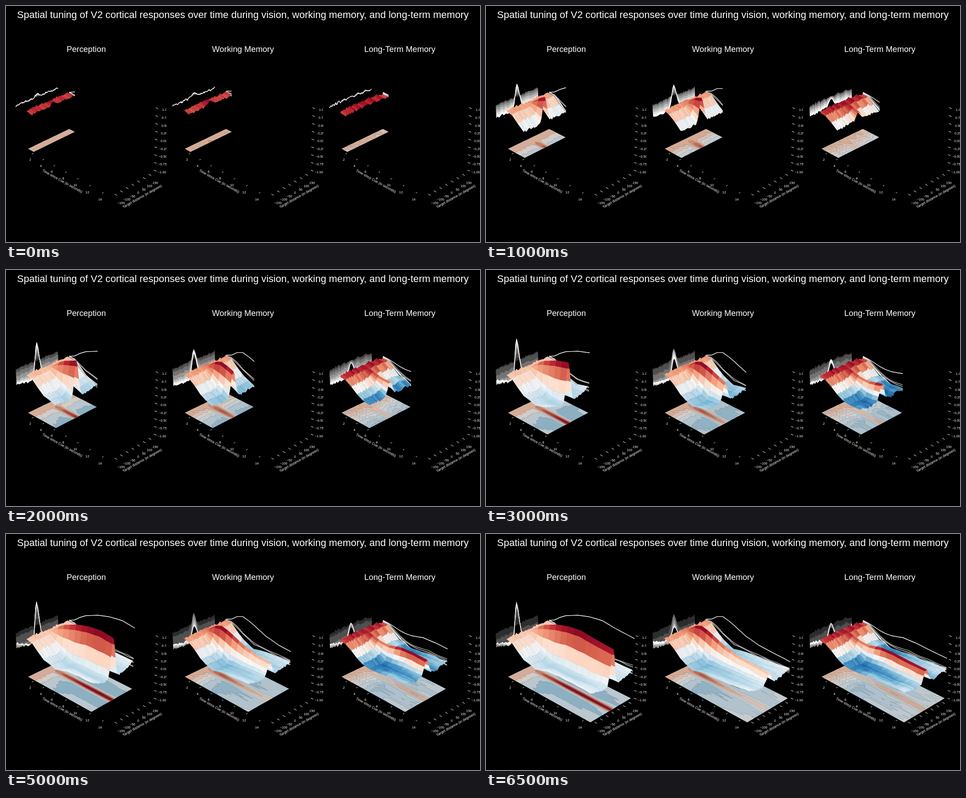
An HTML page with a canvas that plays this animation: 1058x529 px, repeating every 7500 ms.

```html
<!DOCTYPE html>
<html lang="en">
<head>
<meta charset="utf-8">
<title>Spatial tuning over time</title>
<style>
html, body { margin: 0; width: 100%; height: 100%; overflow: hidden; background: #000; }
canvas { display: block; width: 1058px; height: 529px; }
</style>
</head>
<body>
<canvas id="stage"></canvas>
<script>
const W = 1058, H = 529, STEP = 500, LOOP = 7500, LAST = 14, N = 36, PANEL = 350;
const canvas = document.getElementById('stage');
const dpr = window.devicePixelRatio || 1;
canvas.width = W * dpr;
canvas.height = H * dpr;
const ctx = canvas.getContext('2d');
const FONT = '"Liberation Sans", Arial, sans-serif';

const BASE_U = [0, 1, 3, 5, 7, 9, 11, 14];
const PEAK_U = [0, 1, 2, 3, 4, 5, 7, 9, 11, 14];
const panels = [
  { title: 'Perception', band: .2, width: .049, rough: .022,
    edge: [.26, .24, -.13, -.23, -.10, -.05, -.07, -.08],
    trough: [.28, .26, -.13, -.32, -.28, -.30, -.27, -.20],
    peak: [.27, .37, .54, .68, .77, .86, .98, 1.03, .97, .91] },
  { title: 'Working Memory', band: .12, width: .053, rough: .025,
    edge: [.26, .24, -.13, -.28, -.18, -.15, -.13, -.03],
    trough: [.30, .27, -.12, -.32, -.25, -.22, -.18, -.14],
    peak: [.32, .40, .57, .65, .60, .53, .35, .26, .23, .19] },
  { title: 'Long-Term Memory', band: .08, width: .055, rough: .028,
    edge: [.25, .22, -.08, -.22, -.15, -.10, -.08, -.03],
    trough: [.27, .24, -.05, -.26, -.24, -.20, -.18, -.13],
    peak: [.28, .27, .24, .20, .18, .20, .31, .33, .31, .30] }
];

const RAMP = ['053061', '2166ac', '4393c3', '92c5de', 'd1e5f0', 'f7f7f7',
  'fddbc7', 'f4a582', 'd6604d', 'b2182b', '67001f']
  .map(h => [0, 2, 4].map(i => parseInt(h.slice(i, i + 2), 16)));

// t runs from -1 (blue) to 1 (red)
function ramp(t, dim = 1) {
  const x = Math.max(0, Math.min(9.999, (t + 1) * 5)), i = Math.floor(x);
  const c = RAMP[i].map((a, k) => Math.round((a + (RAMP[i + 1][k] - a) * (x - i)) * dim));
  return `rgb(${c})`;
}

function lerpKnots(xs, ys, x) {
  let i = 0;
  while (i < xs.length - 2 && x > xs[i + 1]) i++;
  return ys[i] + (ys[i + 1] - ys[i]) * (x - xs[i]) / (xs[i + 1] - xs[i]);
}

function noise(a, b, c) {
  const s = Math.sin(a * 127.1 + b * 311.7 + c * 74.7 + 3.3) * 43758.5453;
  return 2 * (s - Math.floor(s)) - 1;
}

function buildGrid(p, id) {
  p.z = [];
  for (let u = 0; u <= LAST; u++) {
    const e = lerpKnots(BASE_U, p.edge, u), t = lerpKnots(BASE_U, p.trough, u);
    const top = lerpKnots(PEAK_U, p.peak, u);
    p.z.push(Array.from({ length: N + 1 }, (_, j) => {
      const v = j / N;
      const base = e + (t - e) * Math.min(1, 1.3 * Math.sin(Math.PI * v));
      const bell = Math.exp(-.5 * ((v - .498) / p.width) ** 2);
      const rough = p.rough * (1.3 * noise(j, 0, id) + noise(j, u + 1, id));
      return base + (top - base) * bell + rough * (1 - .8 * bell);
    }));
  }
}
panels.forEach(buildGrid);

// time u (0..14), distance v (0..1), value z
function project(u, v, z) {
  const h = z + 1, w = 1 - .0067 * u + .0517 * v - .0238 * h;
  return [(50 + 11.51 * u + 98.3 * v - 4.26 * h) / w,
          (320 + 4.459 * u - 29.7 * v - 72.25 * h) / w];
}

function trace(pts, close) {
  pts.forEach((q, i) => i ? ctx.lineTo(q[0], q[1]) : ctx.moveTo(q[0], q[1]));
  if (close) ctx.closePath();
}

function stroke(color, width) {
  ctx.strokeStyle = color;
  ctx.lineWidth = width;
  ctx.stroke();
}

// part of a triangle at or above a level, with the cut points
function clipAbove(tri, level) {
  const poly = [], cut = [];
  tri.forEach((a, i) => {
    const b = tri[(i + 1) % 3];
    if (a[2] >= level) poly.push(a);
    if ((a[2] >= level) !== (b[2] >= level)) {
      const k = (level - a[2]) / (b[2] - a[2]);
      const m = [a[0] + (b[0] - a[0]) * k, a[1] + (b[1] - a[1]) * k];
      poly.push(m);
      cut.push(m);
    }
  });
  return { poly, cut };
}

function drawFloor(p, T) {
  const at = (u, j) => [...project(u, j / N, -1), p.z[u][j]];
  const bandColor = n => ramp((n + .3) * p.band, .85);
  const tris = [];
  for (let u = 0; u < T; u++) for (let j = 0; j < N; j++) {
    const a = at(u, j), b = at(u + 1, j), c = at(u + 1, j + 1), d = at(u, j + 1);
    tris.push([a, b, c], [a, c, d]);
  }
  const low = Math.floor(-.5 / p.band);
  ctx.beginPath();
  trace([at(0, 0), at(T, 0), at(T, N), at(0, N)], true);
  ctx.fillStyle = bandColor(low);
  ctx.fill();
  const cuts = [];
  for (let n = low + 1; n * p.band < 1.1; n++) {
    ctx.beginPath();
    for (const t of tris) {
      const { poly, cut } = clipAbove(t, n * p.band);
      if (poly.length) trace(poly, true);
      if (cut.length === 2) cuts.push(cut);
    }
    ctx.fillStyle = bandColor(n);
    ctx.fill();
  }
  ctx.beginPath();
  cuts.forEach(c => trace(c));
  stroke('rgba(70,75,85,.4)', .6);
}

function drawTimeWall(p, T) {
  const slice = u => {
    const i = Math.min(LAST - 1, Math.floor(u));
    return p.z[i].map((z, j) => project(-2, j / N, z + (p.z[i + 1][j] - z) * (u - i)));
  };
  for (let i = 0; i < 7; i++) {
    const g = 45 + 35 * i, color = `rgb(${g},${g},${g})`;
    ctx.beginPath();
    trace([...slice(T * i / 7), ...slice(T * (i + 1) / 7).reverse()], true);
    ctx.fillStyle = color;
    ctx.fill();
    stroke(color, .6);
  }
  ctx.beginPath();
  trace(slice(T));
  stroke('#fff', 1);
}

function drawDistanceWall(p, T) {
  for (const j of [3, 9, 33, 27, 15, 21, 18]) {
    const g = j === 18 ? 255 : 120 + 4 * j;
    ctx.beginPath();
    trace(p.z.slice(0, T + 1).map((row, u) => project(u, 1.015, row[j])));
    stroke(`rgb(${g},${g},${g})`, 1.4);
  }
}

function drawSurface(p, T) {
  const at = (u, j) => project(u, j / N, p.z[u][j]);
  const mean = (u, j) =>
    (p.z[u][j] + p.z[u + 1][j] + p.z[u][j + 1] + p.z[u + 1][j + 1]) / 4;
  const max = Math.max(...p.z.slice(0, T + 1).flat());
  for (let u = 0; u < T; u++) for (let j = N - 1; j >= 0; j--) {
    const color = ramp(mean(u, j) / max);
    ctx.beginPath();
    trace([at(u, j), at(u + 1, j), at(u + 1, j + 1), at(u, j + 1)], true);
    ctx.fillStyle = color;
    ctx.fill();
    stroke(color, .5);
  }
}

function label(text, x, y, size, angle = 0) {
  ctx.save();
  ctx.translate(x, y);
  ctx.rotate(angle * Math.PI / 180);
  ctx.font = `${size}px ${FONT}`;
  ctx.fillStyle = '#fff';
  ctx.textAlign = 'center';
  ctx.textBaseline = 'alphabetic';
  ctx.fillText(text, 0, size * .358);
  ctx.restore();
}

function tick(x, y, dx, dy) {
  ctx.beginPath();
  trace([[x - dx, y - dy], [x + dx, y + dy]]);
  stroke('#fff', 1);
}

const signed = s => String(s).replace('-', '\u2212');

function drawAxes() {
  for (let i = 0; i < 7; i++) {
    // slight perspective growth along the time axis
    const k = i + .018 * i * (i - 6);
    tick(59.5 + 26.1 * k, 331 + 14.6 * k, 1.4, -.8);
    label(2 + 2 * i, 54 + 26 * k, 344.5 + 14.75 * k, 7.3);
    tick(245 + 12.7 * i, 423 - 7.4 * i, 2.7, 1.7);
    label(signed(-150 + 50 * i), 257 + 12.7 * i, 441 - 7.5 * i, 7.3);
  }
  for (let i = 0; i <= 8; i++) {
    const bow = .11 * i * (8 - i) / 4;
    tick(333 + .5 * i, 369 - 17.5 * i + bow, 2.7, 1.2);
    label(signed((-1 + i / 4).toFixed(2)), 348.3 + .95 * i, 372 - 17.4 * i + bow, 7.3);
  }
  label('Time since Cue (in seconds)', 126, 392.5, 8, 29);
  label('Target distance (in degrees)', 304, 426.5, 8, -29.5);
}

function drawScene(T) {
  ctx.setTransform(dpr, 0, 0, dpr, 0, 0);
  ctx.fillStyle = '#000';
  ctx.fillRect(0, 0, W, H);
  ctx.lineJoin = 'round';
  label('Spatial tuning of V2 cortical responses over time during vision, ' +
    'working memory, and long-term memory', 528.8, 19, 22.05);
  panels.forEach((p, i) => {
    ctx.save();
    ctx.translate(i * PANEL, 0);
    ctx.beginPath();
    ctx.rect(0, 40, 358, H);
    ctx.clip();
    label(p.title, 179, 96.7, 18.35);
    drawFloor(p, T);
    drawTimeWall(p, T);
    drawDistanceWall(p, T);
    drawSurface(p, T);
    drawAxes();
    ctx.restore();
  });
}

let shown = 0;
const start = performance.now();
function frame() {
  const t = (performance.now() - start) % LOOP;
  const T = Math.min(LAST, Math.floor(t / STEP) + 1);
  if (T !== shown) drawScene(shown = T);
  requestAnimationFrame(frame);
}
frame();
</script>
</body>
</html>
```
